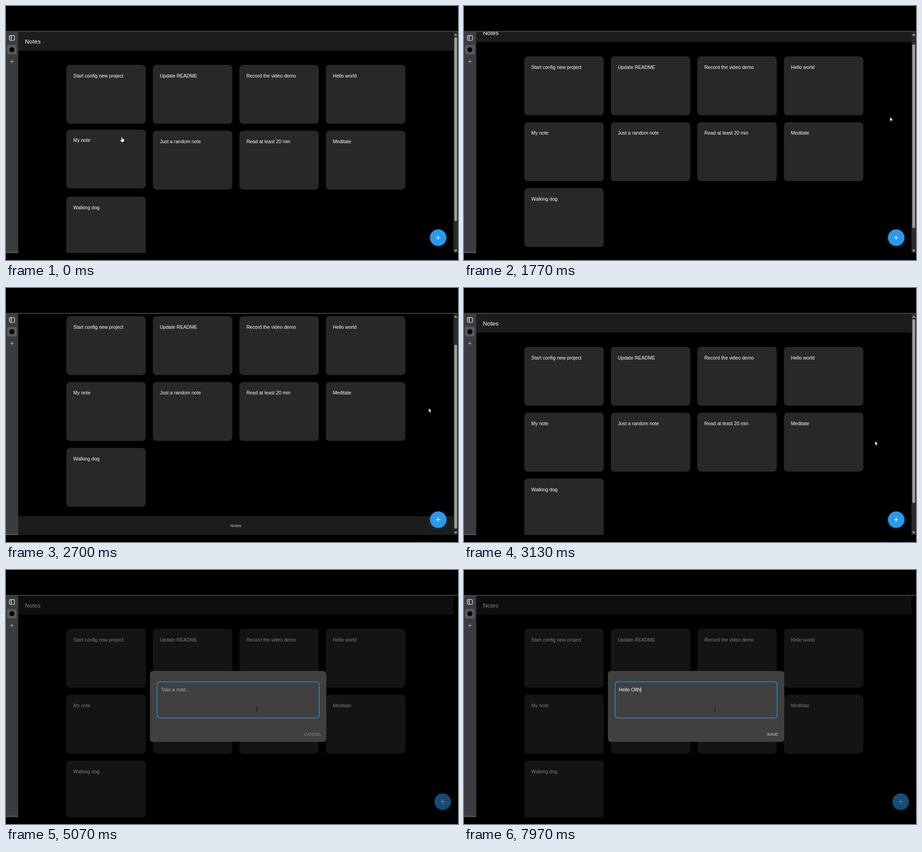
An HTML page with a canvas for the animation above (8 s loop, 998 by 561 pixels).

```html
<!DOCTYPE html>
<html lang="en">
<head>
<meta charset="utf-8">
<title>Notes</title>
<style>
  html, body { margin: 0; width: 100%; height: 100%; overflow: hidden; background: #000; }
  canvas { display: block; width: 998px; height: 561px; }
</style>
</head>
<body>
<canvas id="stage"></canvas>
<script>
const W = 998, H = 561, LOOP = 8000;
const canvas = document.getElementById('stage');
const ctx = canvas.getContext('2d');
const dpr = window.devicePixelRatio || 1;
canvas.width = W * dpr;
canvas.height = H * dpr;

const NOTES = ['Start config new project', 'Update README', 'Record the video demo', 'Hello world',
  'My note', 'Just a random note', 'Read at least 20 min', 'Meditate', 'Walking dog'];
const CARD = { x: 133.2, y: 130, w: 175.4, h: 130, dx: 191.05, dy: 145.5 };
const VIEW = { x: 27, y: 57, w: 971, h: 488.5 };
const MAX_SCROLL = 70, LIFT = 2.6;
const OPEN = 4155, NO_BAR = 4185;
const TYPED = 'Hello OltN';
const KEYS = [6600, 6730, 6860, 6980, 7100, 7230, 7430, 7600, 7740, 7900];

// Pointer hotspot: time, x, y
const PATH = [
  [0, 255.5, 289], [200, 262, 245], [380, 400, 200], [560, 590, 190], [700, 760, 205],
  [800, 799, 257], [900, 802, 311], [1100, 810, 330], [1400, 900, 280], [1650, 940.5, 245],
  [2550, 940.5, 245], [3050, 907.5, 338], [3400, 907.5, 338], [3800, 948, 495],
  [3950, 954, 511], [4130, 954, 511], [4230, 757.5, 398], [4350, 640, 345],
  [4700, 554, 307.5], [8000, 554, 307.5]
];

const clamp = v => Math.max(0, Math.min(1, v));
const smooth = v => v * v * (3 - 2 * v);
const ramp = (t, from, to) => smooth(clamp((t - from) / (to - from)));

// cubic-bezier(.4, 0, .2, 1)
function standardEase(x) {
  if (x <= 0 || x >= 1) return clamp(x);
  let lo = 0, hi = 1, s;
  for (let i = 0; i < 20; i++) {
    s = (lo + hi) / 2;
    const bx = 1.2 * (1 - s) ** 2 * s + 0.6 * (1 - s) * s * s + s ** 3;
    if (bx < x) lo = s; else hi = s;
  }
  return s * s * (3 - 2 * s);
}

function slope(i, k) {
  if (i < 1 || i >= PATH.length - 1) return 0;
  const rate = j => (PATH[j + 1][k] - PATH[j][k]) / (PATH[j + 1][0] - PATH[j][0]);
  const a = rate(i - 1), b = rate(i);
  return a * b <= 0 ? 0 : 2 * a * b / (a + b);
}

function pointer(t) {
  t = Math.max(0, t);
  let i = 0;
  while (i < PATH.length - 2 && PATH[i + 1][0] <= t) i++;
  const p = PATH[i], q = PATH[i + 1], d = q[0] - p[0], u = (t - p[0]) / d;
  const at = k => p[k] + (q[k] - p[k]) * smooth(u)
    + d * (slope(i, k) * u * (1 - u) ** 2 - slope(i + 1, k) * u * u * (1 - u));
  return { x: at(1), y: at(2) };
}

const scrollAt = t => MAX_SCROLL * (ramp(t, 1710, 1890) - ramp(t, 2680, 2880));
const cardPos = i => ({ x: CARD.x + (i % 4) * CARD.dx, y: CARD.y + Math.floor(i / 4) * CARD.dy });

function hoveredCard(t) {
  if (t >= OPEN) return -1;
  const p = pointer(t), s = scrollAt(t);
  return NOTES.findIndex((_, i) => {
    const c = cardPos(i);
    return p.x > c.x && p.x < c.x + CARD.w && p.y + s > c.y && p.y + s < c.y + CARD.h;
  });
}

const overFab = t => {
  const p = pointer(t);
  return t < OPEN && Math.hypot(p.x - 954.3, p.y - 511.5) < 18.2;
};

// Share of the last 200 ms in which a condition held
function held(t, test) {
  let n = 0;
  for (let k = 0; k < 20; k++) if (test(t - k * 10)) n++;
  return smooth(n / 20);
}

function rect(x, y, w, h, color, r = 0) {
  ctx.fillStyle = color;
  ctx.beginPath();
  ctx.roundRect(x, y, w, h, r);
  ctx.fill();
}

function circle(x, y, r, color) {
  ctx.fillStyle = color;
  ctx.beginPath();
  ctx.arc(x, y, r, 0, Math.PI * 2);
  ctx.fill();
}

function text(str, x, y, size, color) {
  ctx.font = `${size}px "Liberation Sans", Arial, sans-serif`;
  ctx.fillStyle = color;
  ctx.fillText(str, x, y);
}

function poly(points, fill) {
  ctx.beginPath();
  points.forEach(([x, y]) => ctx.lineTo(x, y));
  ctx.closePath();
  ctx.fillStyle = fill;
  ctx.fill();
}

function plus(x, y, r, color, weight) {
  ctx.strokeStyle = color;
  ctx.lineWidth = weight;
  ctx.beginPath();
  ctx.moveTo(x - r, y); ctx.lineTo(x + r, y);
  ctx.moveTo(x, y - r); ctx.lineTo(x, y + r);
  ctx.stroke();
}

function drawSidebar() {
  rect(0, 55, 27, 490.5, '#3b3c40');
  rect(0, 55, W, 2, '#434343');
  rect(0, 543, 27, 2.5, '#565656');
  ctx.strokeStyle = '#f2f2f2';
  ctx.lineWidth = 1.2;
  ctx.beginPath();
  ctx.roundRect(7.5, 65.3, 11.3, 10.7, 1.8);
  ctx.moveTo(11.8, 65.3);
  ctx.lineTo(11.8, 76);
  ctx.stroke();
  for (let i = 0; i < 3; i++) rect(9.2, 67.4 + i * 2, 1.3, 0.9, '#d0d0d0');
  rect(2.5, 86, 21, 21, '#58585a', 4);
  circle(13, 96.5, 5.5, '#000');
  plus(13, 122.5, 3.6, '#c8c8c8', 1);
}

function drawPage(t) {
  const s = scrollAt(t);
  rect(27, 57 - s, 961, 41.5, '#1c1c1c');
  text('Notes', 41.8, 82.6 - s, 13.2, '#fff');
  NOTES.forEach((note, i) => {
    const c = cardPos(i), y = c.y - s - LIFT * held(t, u => hoveredCard(u) === i);
    rect(c.x, y, CARD.w, CARD.h, '#28282a', 8);
    text(note, c.x + 15.4, y + 27.5, 10.6, '#fff');
  });
  rect(27, 571.5 - s, 961, 44, '#1c1c1c');
  text('Notes', 495.2, 596.3 - s, 9.3, '#c4c4c4');
}

function drawFab(t) {
  const x = t < NO_BAR ? 954.3 : 964.2, y = 511.6;
  ctx.save();
  ctx.shadowColor = 'rgba(33,150,243,.3)';
  ctx.shadowBlur = 7 * dpr;
  ctx.shadowOffsetY = 2 * dpr;
  circle(x, y, 18.2 + 0.5 * held(t, overFab), '#2a9aec');
  ctx.restore();
  plus(x, y, 4.8, '#fff', 1.3);
}

function drawScrollbar(t) {
  if (t >= NO_BAR) return;
  rect(988, 57, 10, 488.5, '#2b2b2d');
  poly([[989.5, 65.5], [993, 60.3], [996.5, 65.5]], '#a0a0a0');
  poly([[989.5, 538], [993, 543.2], [996.5, 538]], '#a0a0a0');
  rect(990, 69 + scrollAt(t) * 58 / MAX_SCROLL, 6, 406, '#9f9f9f', 3);
}

function drawDialog(t) {
  const k = standardEase((t - OPEN) / 225);
  if (k <= 0) return;
  rect(VIEW.x, VIEW.y, VIEW.w, VIEW.h, `rgba(0,0,0,${0.5 * k})`);
  ctx.save();
  ctx.globalAlpha = k;
  rect(317.7, 223, 389.5, 156.6, '#404040', 6.5);
  ctx.strokeStyle = '#2b9bee';
  ctx.lineWidth = 1.3;
  ctx.beginPath();
  ctx.roundRect(333.5, 246.8, 358, 80, 6.5);
  ctx.stroke();

  const count = KEYS.filter(key => key <= t).length;
  const typed = TYPED.slice(0, count);
  if (count) {
    text(typed, 342, 268.2, 10.6, '#fff');
    text('SAVE', 669, 366, 9.3, '#dedede');
  } else {
    text('Take a note...', 342, 268.2, 10.6, '#ababab');
    text('CANCEL', 658.2, 366, 9.3, '#8e8e8e');
  }
  const since = t - (count ? KEYS[count - 1] : 4170);
  if (since % 1000 < 500) {
    ctx.font = '10.6px "Liberation Sans", Arial, sans-serif';
    rect(342 + ctx.measureText(typed).width, 259, 0.9, 11.2, '#fff');
  }
  ctx.restore();
}

function drawArrow() {
  const shape = [[0, 0], [0, 9.4], [2.1, 7.5], [3.5, 10.6], [5, 9.9], [3.7, 6.9], [6.5, 6.7]];
  poly(shape, '#fff');
  ctx.strokeStyle = '#000';
  ctx.lineWidth = 0.6;
  ctx.stroke();
}

function drawHand() {
  ctx.beginPath();
  ctx.moveTo(-1.1, 0.8);
  ctx.quadraticCurveTo(0, -0.7, 1.1, 0.8);
  ctx.lineTo(1.2, 3.8);
  ctx.lineTo(4.6, 4.7);
  ctx.quadraticCurveTo(5.9, 5.2, 5.6, 7);
  ctx.lineTo(4.8, 11.6);
  ctx.lineTo(-0.6, 11.6);
  ctx.lineTo(-3.7, 7.6);
  ctx.quadraticCurveTo(-3.6, 6, -1.1, 7.6);
  ctx.closePath();
  ctx.fillStyle = '#fff';
  ctx.fill();
  ctx.strokeStyle = '#000';
  ctx.lineWidth = 0.6;
  ctx.stroke();
}

function drawIBeam() {
  ctx.strokeStyle = '#141414';
  ctx.lineWidth = 1;
  ctx.beginPath();
  ctx.moveTo(-2, -4.3); ctx.lineTo(2, -4.3);
  ctx.moveTo(0, -4.3); ctx.lineTo(0, 4.3);
  ctx.moveTo(-2, 4.3); ctx.lineTo(2, 4.3);
  ctx.stroke();
}

function drawPointer(t) {
  const p = pointer(t);
  const inField = t > OPEN && p.x > 333 && p.x < 692 && p.y > 247 && p.y < 327;
  ctx.save();
  ctx.translate(p.x, p.y);
  if (inField) drawIBeam();
  else if (hoveredCard(t) >= 0 || overFab(t)) drawHand();
  else drawArrow();
  ctx.restore();
}

function draw(t) {
  ctx.setTransform(dpr, 0, 0, dpr, 0, 0);
  rect(0, 0, W, H, '#000');
  ctx.save();
  ctx.beginPath();
  ctx.rect(VIEW.x, VIEW.y, VIEW.w, VIEW.h);
  ctx.clip();
  drawPage(t);
  drawFab(t);
  drawScrollbar(t);
  drawDialog(t);
  ctx.restore();
  drawSidebar();
  drawPointer(t);
}

function frame() {
  draw(performance.now() % LOOP);
  requestAnimationFrame(frame);
}
frame();
</script>
</body>
</html>
```
